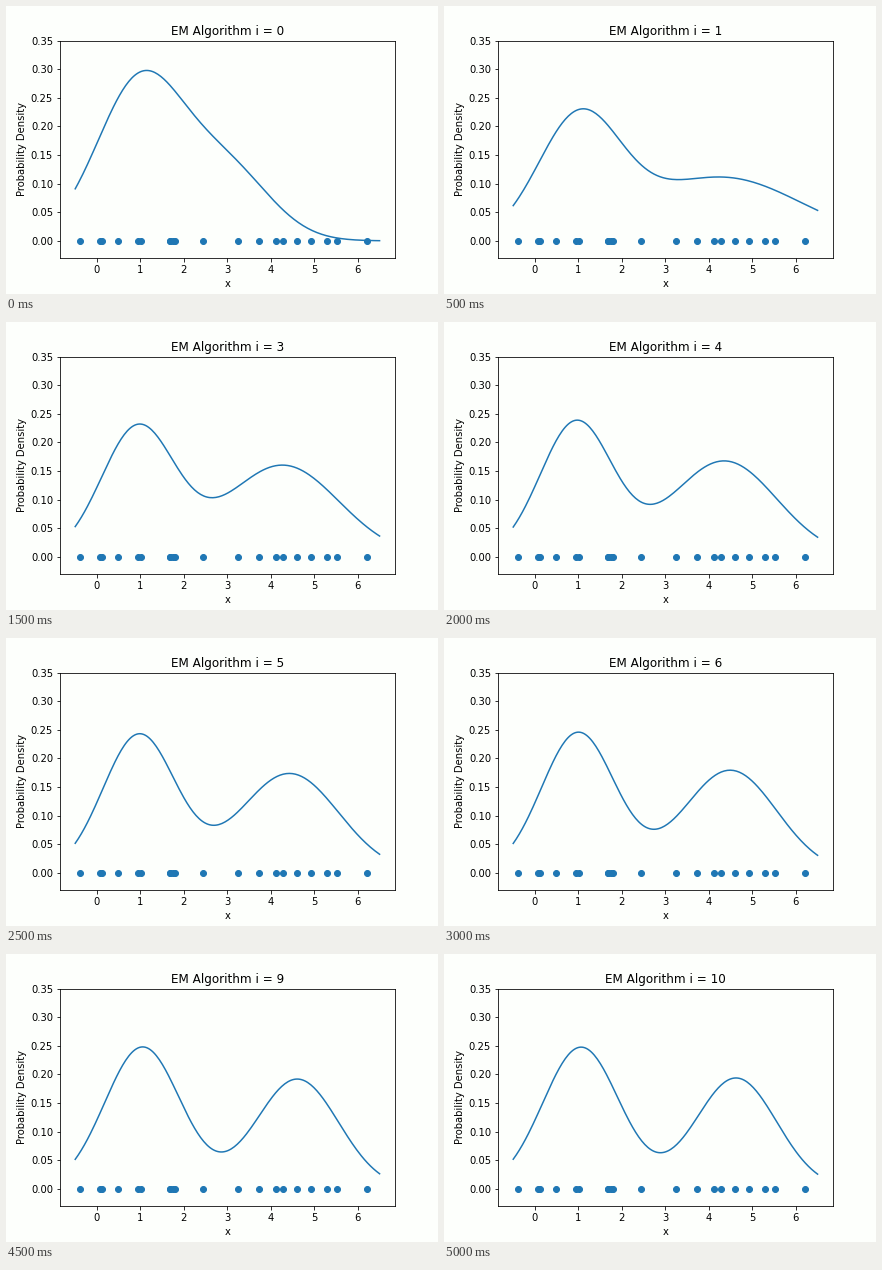
A matplotlib script that plays this animation: 432 by 288 pixels, repeating every 5500 ms.

```python
import numpy as np
import matplotlib.pyplot as plt
from matplotlib.animation import FuncAnimation

STEPS = 11
PAPER = "#fdfffc"

data = np.array([-0.39, 0.12, 0.94, 1.67, 1.76, 2.44, 3.72, 4.28, 4.92, 5.53,
                 0.06, 0.48, 1.01, 1.68, 1.80, 3.25, 4.12, 4.60, 5.28, 6.22])
grid = np.linspace(-0.5, 6.5, 200)


def components(x, weight, mean, var):
    """Weighted normal densities, one row per component."""
    z = (x - mean[:, None]) ** 2 / var[:, None]
    return weight[:, None] * np.exp(-z / 2) / np.sqrt(2 * np.pi * var[:, None])


def em_step(weight, mean, var):
    """One EM update; the variances use the previous means."""
    resp = components(data, weight, mean, var)
    resp /= resp.sum(axis=0)
    total = resp.sum(axis=1)
    spread = (data - mean[:, None]) ** 2
    return (total / data.size,
            resp @ data / total,
            (resp * spread).sum(axis=1) / total)


def density_curves():
    params = np.array([0.7, 0.3]), np.array([1.0, 3.0]), np.ones(2)
    curves = []
    for _ in range(STEPS):
        curves.append(components(grid, *params).sum(axis=0))
        params = em_step(*params)
    return curves


curves = density_curves()

plt.rcParams.update({"font.family": "DejaVu Sans", "font.size": 10})
fig, ax = plt.subplots(figsize=(6, 4), dpi=72, facecolor=PAPER)
fig.subplots_adjust(left=0.125, right=0.9, bottom=0.125, top=0.88)
ax.set_facecolor(PAPER)
ax.set_xlim(-0.85, 6.85)
ax.set_ylim(-0.03, 0.35)
ax.set_xlabel("x")
ax.set_ylabel("Probability Density")
ax.scatter(data, np.zeros_like(data), color="C0")
line, = ax.plot(grid, curves[0], color="C0")
title = ax.set_title("EM Algorithm i = 0")


def update(i):
    line.set_ydata(curves[i])
    title.set_text(f"EM Algorithm i = {i}")
    return line, title


anim = FuncAnimation(fig, update, frames=STEPS, interval=500,
                     repeat=True, repeat_delay=0, blit=False)
plt.show()
```
